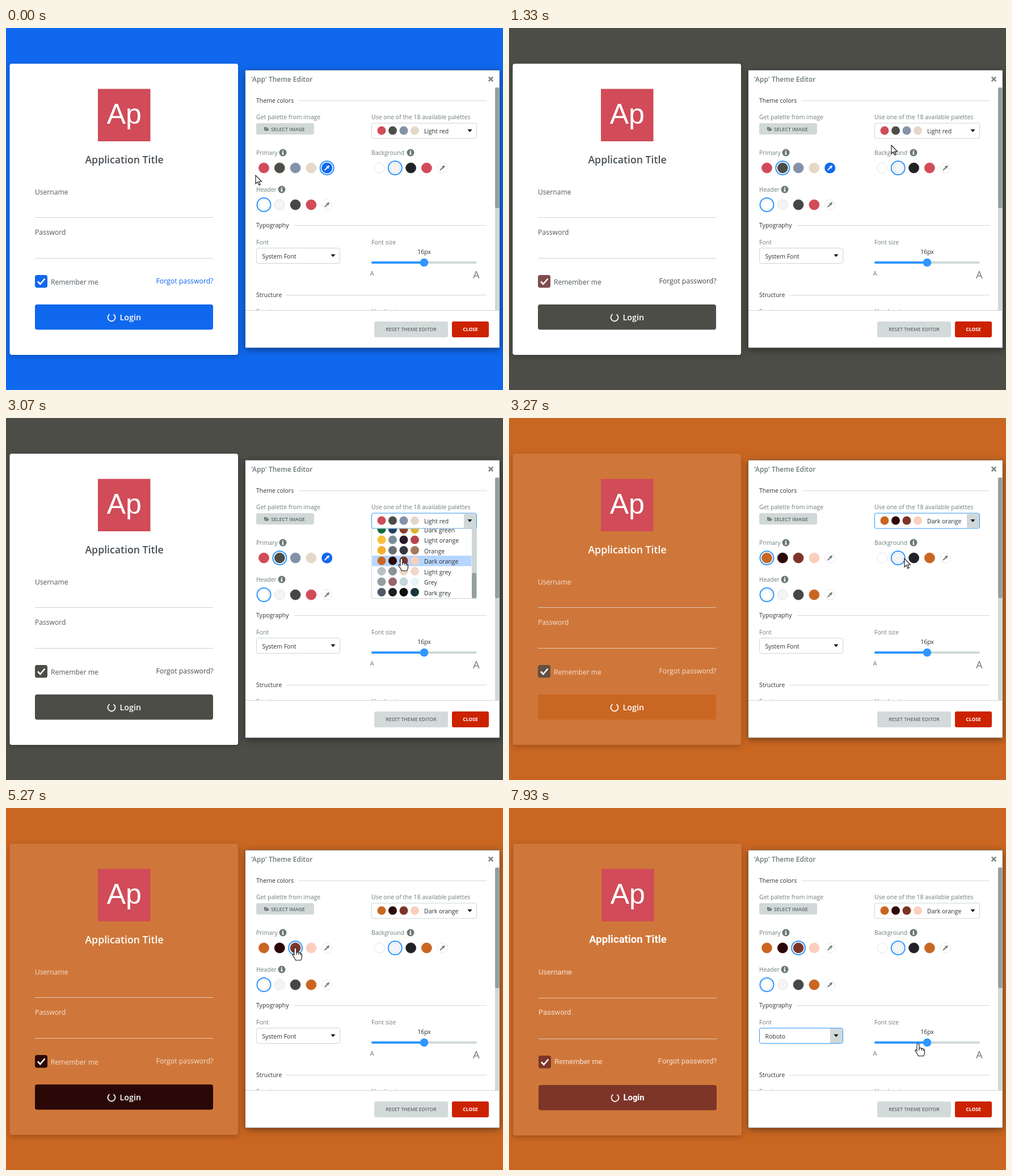
Recreate the animation shown at these times as an HTML page with a canvas. Size 876 by 639 pixels, loop 8 s.

```html
<!DOCTYPE html>
<html lang="en">
<head>
<meta charset="utf-8">
<title>Theme editor</title>
<style>
html, body { margin: 0; width: 100%; height: 100%; overflow: hidden; }
canvas { display: block; width: 876px; height: 639px; }
</style>
</head>
<body>
<canvas width="876" height="639"></canvas>
<script>
const ctx = document.querySelector('canvas').getContext('2d');
const LOOP = 8000, TAU = Math.PI * 2;
const UI = '"Open Sans", "Noto Sans", sans-serif', ROBOTO = 'Roboto, sans-serif', ARIAL = '"Liberation Sans", Arial, sans-serif';
const BLUE = '#1068ee', RED = '#d14b58', DARK = '#4d4d47', ORANGE = '#c96622', BLACKISH = '#2b0808', BROWN = '#7d3528';
const FOCUS = '#2f96ff', GREY = '#d0d9d8', LABEL = '#717e7d', INK = '#2b3234';

// Palettes: three shades for each of six families
const known = {
  'Light red': [RED, DARK, '#8492a9', '#e5d8c8'],
  'Dark green': ['#12693a', '#1d3f5e', '#8a3f2b', '#e0b030'],
  'Light orange': ['#fbbf3c', '#7c8d9a', '#2a1a2a', '#b8434f'],
  'Orange': ['#f5b02e', '#6b6f75', '#35363f', '#a57a5c'],
  'Dark orange': [ORANGE, BLACKISH, BROWN, '#fbcfbd'],
  'Light grey': ['#b9c1c3', '#8a9496', '#f0d5c5', '#f2d6c8'],
  'Grey': ['#939ea0', '#9a6468', '#c5d5de', '#e6f3fb'],
  'Dark grey': ['#4f5a64', '#1e1e1f', '#0d0d0e', '#18363c']
};
const hues = { red: 355, purple: 280, blue: 212, green: 145, orange: 28, grey: 200 };
const palettes = Object.entries(hues).flatMap(([family, h]) => ['Light ', '', 'Dark '].map((shade, i) => {
  const name = shade + (shade ? family : family[0].toUpperCase() + family.slice(1));
  const tone = (dh, s, l) => `hsl(${h + dh} ${s}% ${l}%)`;
  const colors = known[name] || [tone(0, 60, 62 - i * 17), tone(30, 25, 36 - i * 9), tone(180, 20, 55 - i * 9), tone(40, 40, 84)];
  return { name, colors };
}));
const fonts = ['System Font', 'Open Sans', 'Roboto', 'Lato', 'PT Serif', 'Ubuntu'];

// Timelines: [time, value]
const primary = [[0, BLUE], [670, RED], [1170, DARK], [3230, ORANGE], [4530, BLACKISH], [5280, BROWN]];
const ringed = [[0, 4], [670, 0], [1130, 1], [3200, 0], [4470, 1], [5230, 2]];
// Pointer: time, x, y, hand
const path = [
  [0, 440, 260, 0], [70, 440, 260, 0], [500, 455, 246, 1], [740, 455, 246, 1], [1000, 481, 246, 1], [1170, 481, 246, 0],
  [1330, 674, 207, 0], [1480, 790, 185, 0], [1740, 790, 185, 0], [1800, 775, 210, 1], [2070, 697, 248, 1], [3270, 697, 248, 0],
  [3870, 548, 282, 0], [4250, 481, 245, 1], [4600, 481, 245, 1], [4900, 510, 247, 1], [5670, 510, 247, 0],
  [6070, 630, 385, 0], [6270, 574, 401, 0], [6670, 574, 403, 0], [6800, 538, 423, 0], [7200, 492, 462, 0],
  [7530, 492, 462, 0], [7860, 721, 416, 1], [8000, 721, 416, 1]
];
const arrow = new Path2D('M0 0v15l3.4-3.2 2.6 5.6 2.2-1-2.6-5.4h4.9z');
const hand = new Path2D('M-2 2q0-2 2-2t2 2v6q3-1.5 4 .7q2.6-.9 3.3 1q2.3-.2 2.2 2v4q0 3-2 6h-9q-1.5-4-5-8q-1.2-2.4.6-2.8q1.2 0 1.9 1.4z');
const knuckles = new Path2D('M2 8v4M6 9v3M9.3 10v3');

const clamp = v => Math.max(0, Math.min(1, v));
const ease = v => v * v * (3 - 2 * v);
const at = (keys, t) => keys.filter(k => k[0] <= t).pop()[1];

function mix(a, b, k) {
  const part = (c, i) => parseInt(c.slice(i, i + 2), 16);
  return `rgb(${[1, 3, 5].map(i => Math.round(part(a, i) + (part(b, i) - part(a, i)) * k))})`;
}

function faded(keys, t, ms) {
  const i = keys.filter(k => k[0] <= t).length - 1;
  return i ? mix(keys[i - 1][1], keys[i][1], clamp((t - keys[i][0]) / ms)) : keys[0][1];
}

function pointer(t) {
  const i = path.findIndex(k => k[0] > t), a = path[i - 1], b = path[i];
  const k = ease((t - a[0]) / (b[0] - a[0]));
  return { x: a[1] + (b[1] - a[1]) * k, y: a[2] + (b[2] - a[2]) * k, hand: a[3] };
}

function text(s, x, y, size, color, { weight = 400, align = 'left', font = UI } = {}) {
  ctx.font = `${weight} ${size}px ${font}`;
  ctx.textAlign = align;
  ctx.fillStyle = color;
  ctx.fillText(s, x, y);
}

function box(x, y, w, h, r, fill, stroke) {
  ctx.beginPath();
  ctx.roundRect(x, y, w, h, r);
  if (fill) { ctx.fillStyle = fill; ctx.fill(); }
  if (stroke) { ctx.strokeStyle = stroke; ctx.lineWidth = 1; ctx.stroke(); }
}

function shadowBox(x, y, w, h, r, fill, blur, alpha) {
  ctx.save();
  ctx.shadowColor = `rgba(0,0,0,${alpha})`;
  ctx.shadowBlur = blur;
  ctx.shadowOffsetY = 3;
  box(x, y, w, h, r, fill);
  ctx.restore();
}

function dot(x, y, r, fill, stroke, width = 1) {
  ctx.beginPath();
  ctx.arc(x, y, r, 0, TAU);
  if (fill) { ctx.fillStyle = fill; ctx.fill(); }
  if (stroke) { ctx.strokeStyle = stroke; ctx.lineWidth = width; ctx.stroke(); }
}

function line(points, color, width = 1) {
  ctx.beginPath();
  points.forEach(([x, y]) => ctx.lineTo(x, y));
  ctx.strokeStyle = color;
  ctx.lineWidth = width;
  ctx.stroke();
}

function caret(x, y) {
  ctx.beginPath();
  ctx.moveTo(x - 4, y - 2);
  ctx.lineTo(x + 4, y - 2);
  ctx.lineTo(x, y + 2.8);
  ctx.fillStyle = '#111';
  ctx.fill();
}

function select(x, y, w, focused) {
  box(x, y, w, 27, 3, '#fff', focused ? FOCUS : '#cdd5d4');
  if (focused) box(x + w - 22.5, y + .5, 22, 26, [0, 2, 2, 0], GREY);
  caret(x + w - 12, y + 13);
}

function section(label, y, x) {
  text(label, 441, y + 3.5, 10.5, INK);
  line([[x, y + .5], [847, y + .5]], '#d3d9d9');
}

function info(x, y) {
  dot(x, y, 6.5, '#6b7978');
  ctx.fillStyle = '#fff';
  ctx.fillRect(x - 1, y - 3.8, 2, 2);
  ctx.fillRect(x - 1, y - 1, 2, 4);
  ctx.fillRect(x - 2, y - 1, 2, 1);
  ctx.fillRect(x - 2, y + 2.5, 4, 1);
}

function dropper(x, y, fill) {
  if (fill) dot(x, y, 9.5, fill);
  else {
    ctx.setLineDash([2, 1.5]);
    dot(x, y, 9, '#fff', '#d3d9d9');
    ctx.setLineDash([]);
  }
  const c = fill ? '#fff' : '#6f7c7b';
  line([[x + 1.5, y - 1.5], [x + 3.7, y - 3.7]], c, 3);
  line([[x - .8, y - 3], [x + 3, y + .8]], c, 1.4);
  line([[x + 1, y - 1], [x - 4, y + 4]], c, 2);
}

function swatches(x, y, colors, selected, custom, cur) {
  for (let i = 0; i < 5; i++) {
    const cx = x + i * 27.8;
    const hover = cur && cur.hand && Math.hypot(cur.x - cx, cur.y - y) < 10;
    if (i === selected || hover) dot(cx, y, 12, '#fff', i === selected ? FOCUS : '#b9dcff', 2);
    if (i === 4) dropper(cx, y, custom);
    else dot(cx, y, 9, colors[i], /^#f[f3]/.test(colors[i]) ? '#d9dedf' : colors[i], .8);
  }
}

function paletteRow({ name, colors }, y) {
  colors.forEach((c, i) => dot(662 + i * 19.5, y - .5, 7.5, c));
  text(name, 737, y + 4.5, 10.5, INK);
}

function loginCard(t, cur) {
  const tinted = t >= 3230, roboto = t >= 7530, main = at(primary, t);
  const d = roboto ? 1 : 0, font = roboto ? ROBOTO : UI;
  const size = roboto ? 13 : 12.1;
  const label = tinted ? '#f6dfd0' : '#4f585e';
  const page = tinted ? ORANGE : main;

  ctx.fillStyle = page;
  ctx.fillRect(0, 0, 876, 639);
  shadowBox(6.5 + d, 63, 402.5, 514 + d, 4, tinted ? ORANGE : '#fff', 10, .22);
  if (tinted) box(6.5 + d, 63, 402.5, 514 + d, 4, 'rgba(255,255,255,.11)');

  box(162 + d, 107.5, 92.5, 92.5, 0, RED);
  text('Ap', 208.3 + d, 169, 50, '#fff', { align: 'center', font: ARIAL });
  text('Application Title', 208.5 + d, 239 - d, roboto ? 18.5 : 17.7, tinted ? '#fff' : '#474f55', { weight: roboto ? 700 : 600, align: 'center', font });
  text('Username', 51 + d, 293.5, size, label, { font });
  text('Password', 51 + d, 364.5, size, label, { font });
  for (const y of [334.5, 406.5]) line([[51 + d, y + d], [365 + d, y + d]], tinted ? '#e3c9b8' : '#cdd0d2');

  box(51 + d, 436 + d, 22, 22.5, 4, faded(primary, t, 260));
  line([[56 + d, 447.5 + d], [60.3 + d, 452 + d], [68.5 + d, 442.5 + d]], '#fff', 2.6);
  text('Remember me', 79 + d, 453 - d, size, label, { font });
  text('Forgot password?', 365.5 + d, 451, roboto ? 13 : 12.3, tinted ? label : main === DARK ? '#464a4a' : main, { align: 'right', font });

  box(51 + d, 488 + d, 314, 44.5, 4, main);
  ctx.beginPath();
  ctx.arc(186 + d, 511 + d * .5, 6.5, -Math.PI / 2 + .55, Math.PI * 1.5 - .55);
  ctx.strokeStyle = '#fff';
  ctx.lineWidth = 1.8;
  ctx.stroke();
  text('Login', 200.5 + d, 516, roboto ? 14.8 : 14.3, '#fff', { weight: roboto ? 700 : 600, font });
}

function editor(t, cur) {
  const orange = t >= 3200;
  const palette = palettes.find(p => p.name === (orange ? 'Dark orange' : 'Light red'));
  const accent = palette.colors[0];

  shadowBox(422, 74.5, 448, 490, 1, '#fff', 13, .45);
  box(421.5, 74.5, 448.5, 490, 1, null, 'rgba(80,100,110,.45)');
  text("'App' Theme Editor", 432, 94.5, 12, '#6b7877', { weight: 600 });
  line([[850.7, 86.5], [858.3, 94]], '#7f8b8a', 2.6);
  line([[858.3, 86.5], [850.7, 94]], '#7f8b8a', 2.6);

  section('Theme colors', 128, 516);
  text('Get palette from image', 441, 161, 10.5, LABEL);
  box(441, 168, 102, 20, 3, GREY);
  ctx.fillStyle = '#66736f';
  ctx.fill(new Path2D('M455 181v-6h3l1 1h3v1.5h-4.5zM455.6 181.6l2-3.4h6.4l-2 3.4z'));
  text('SELECT IMAGE', 467, 181.5, 8.8, '#5b6866', { weight: 600 });

  text('Use one of the 18 available palettes', 644, 161, 10.55, LABEL);
  select(644.5, 168, 185, t >= 1530 && t < 4470);
  paletteRow(palette, 181.5);

  text('Primary', 441, 223.5, 10.3, LABEL);
  info(488, 220);
  swatches(454.5, 247, palette.colors, at(ringed, t), orange ? null : BLUE, cur);
  text('Background', 644, 223.5, 10.4, LABEL);
  info(713, 220);
  swatches(658, 247, ['#ffffff', '#f3f4f6', '#212226', accent], 1);
  text('Header', 441, 288.5, 10.4, LABEL);
  info(486, 285);
  swatches(454.5, 312, ['#ffffff', '#f3f4f6', '#464646', accent], 0);

  section('Typography', 348, 508);
  text('Font', 441, 381.5, 10.5, LABEL);
  select(441.5, 388.5, 147, t >= 6330);
  text(t >= 7470 ? 'Roboto' : 'System Font', 451.5, 406.5, 10.5, INK);

  text('Font size', 644, 381.5, 10.5, LABEL);
  text('16px', 737, 398.5, 10.5, INK, { align: 'center' });
  box(644, 412, 186, 4, 2, GREY);
  box(644, 412, 93, 4, 2, FOCUS);
  dot(737, 414, 7.3, FOCUS);
  text('A', 641.5, 437, 11, LABEL);
  text('A', 823, 441.5, 18.5, LABEL);

  section('Structure', 471, 494);
  ctx.save();
  ctx.beginPath();
  ctx.rect(422, 480, 440, 18);
  ctx.clip();
  text('Spacing', 441, 504, 10.5, LABEL);
  text('Header size', 644, 504, 10.5, LABEL);
  ctx.restore();

  box(862, 105, 7.5, 393, 0, GREY);
  box(862, 105, 7.5, 213, 3, '#92a09f');
  line([[422, 498.5], [870, 498.5]], '#cfd6d6');
  box(649, 518, 130, 28, 3, '#d3dbda');
  text('RESET THEME EDITOR', 714, 535.2, 8.7, '#5f6c6b', { weight: 600, align: 'center' });
  box(786, 518, 65, 28, 3, '#cc2200');
  text('CLOSE', 818.5, 535.2, 8.6, '#fff', { weight: 700, align: 'center' });
}

function paletteList(t, cur) {
  const scroll = ease(clamp((t - 1800) / 270)), top = 196 - scroll * 212, row = 18.5;
  box(644.5, 195.5, 185, 123, 0, '#fff', '#cdd5d4');
  ctx.save();
  ctx.beginPath();
  ctx.rect(645, 195.5, 184, 122.5);
  ctx.clip();
  palettes.forEach((p, i) => {
    const y = top + i * row;
    if (cur.y >= y && cur.y < y + row) box(645.5, y, 175, row, 0, '#b6d5ff');
    paletteRow(p, y + 9.5);
  });
  box(821, 196, 8, 122, 0, GREY);
  box(821, 196 + scroll * 77.5, 8, 44.5, 3, '#92a09f');
  ctx.restore();
}

function fontList(cur) {
  const row = 18.6, hot = Math.max(0, Math.floor((cur.y - 417) / row));
  box(441.5, 416, 147, 113.5, 0, '#fff', '#cdd5d4');
  fonts.forEach((f, i) => {
    const y = 417.3 + i * row;
    if (i === hot) box(442.5, y, 145, row, 0, FOCUS);
    text(f, 445, y + 13.5, 10.5, i === hot ? '#fff' : INK);
  });
}

function drawPointer(cur) {
  ctx.save();
  ctx.translate(cur.x, cur.y);
  const shape = cur.hand ? hand : arrow;
  ctx.fillStyle = '#fff';
  ctx.strokeStyle = '#111';
  ctx.lineWidth = 1.1;
  ctx.fill(shape);
  ctx.stroke(shape);
  if (cur.hand) ctx.stroke(knuckles);
  ctx.restore();
}

function draw(t) {
  const cur = pointer(t);
  loginCard(t);
  editor(t, cur);
  if (t >= 1670 && t < 3200) paletteList(t, cur);
  if (t >= 6470 && t < 7470) fontList(cur);
  drawPointer(cur);
}

const start = performance.now();
function tick() {
  draw((performance.now() - start) % LOOP);
  requestAnimationFrame(tick);
}
tick();
</script>
</body>
</html>
```
